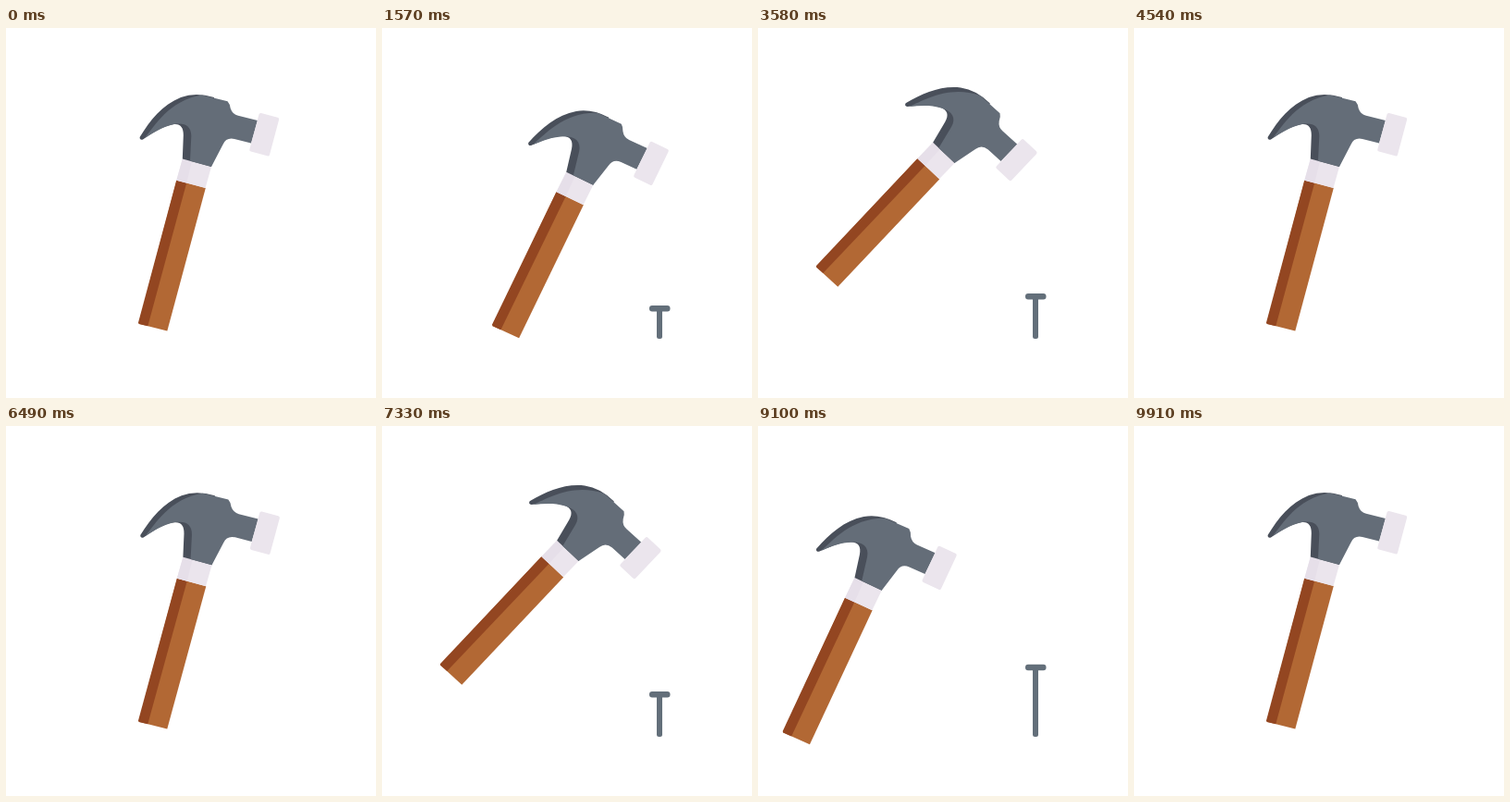
An HTML page for the animation above (9940 ms loop, 400 by 400 pixels).

```html
<!DOCTYPE html>
<html lang="en">
<head>
<meta charset="utf-8">
<title>Hammer and nail</title>
<style>
  html, body { margin: 0; width: 100%; height: 100%; overflow: hidden; background: #fff; }
  svg { display: block; width: 100%; height: 100%; }
</style>
</head>
<body>
<svg viewBox="0 0 400 400">
  <g id="nail" fill="#636f7a">
    <rect id="shank" x="297" width="6" rx="2.5"/>
    <rect id="cap" x="289" width="22.500" height="6.500" rx="3"/>
  </g>
  <g id="hammer">
    <path fill="#b26834" d="M143.500 319.800 174.300 327.500 215.800 173 184.500 164.500Z"/>
    <path fill="#934621" d="M143 318.500 143.800 320 153.300 322.300 195.200 167.500 184.300 164.500Z"/>
    <path fill="#ebe5ed" d="M184.300 164.700 215.500 173 222 150 190.800 141.500Z"/>
    <path fill="#e6dfe9" d="M184.300 164.700 195.200 167.600 201 144 190.800 141.500Z"/>
    <path fill="#494f5a" d="M144.600 118C156 99.500 169 83 189 75Q205 69 225 75L222 150 190.800 141.500 191.800 116C192 107 188 102.500 179 104.500 167 107 158 114 148 120.500Q144.500 121.500 144.600 118Z"/>
    <path fill="#646d78" d="M150 119C160 107 176 78 212 72.500L239.500 79.300Q242 82 242.700 87 245 93.500 251 94.800L272 100 265 124.500 247 120Q238 118 234.500 126L222 150 199 143.700 200.300 117C200.500 106 193 102 182 104 168 107 160 113 150 119Z"/>
    <rect x="268" y="93.700" width="22.400" height="43" rx="2" fill="#ebe5ed" transform="rotate(15 279.200 115.200)"/>
  </g>
</svg>
<script>
const LOOP = 9940, STEP = 30, START = 1030, BACK = 6400, LAST = 117;
const REST = { x: 143.5, y: 319.5 }, SWING = { x: 63, y: 258 };

const linear = p => p;
const easeIn = n => p => p ** n;
const easeOut = n => p => 1 - (1 - p) ** n;
const smooth = p => p * p * (3 - 2 * p);

// Each key: step, value, easing on the way there.
const turnKeys = [
  [-1, 0], [8, 14.3, smooth], [15, 11, smooth], [26, 10, smooth],
  [38, 57, easeIn(2.3)], [52, 15.5, easeOut(1.77)],
  [64, 60, easeIn(2.3)], [78, 12.8, easeOut(1.8)],
  [90, 72, easeIn(2.48)], [LAST, 0, easeOut(3.1)]
];
const xKeys = [
  [-1, REST.x], [15, 140, easeIn(2)], [26, 27, smooth],
  [38, SWING.x, easeOut(1.67)], [90, SWING.x, linear], [LAST, REST.x, easeOut(4.6)]
];
const yKeys = [
  [-1, REST.y], [15, REST.y, linear], [26, 331, smooth],
  [38, SWING.y, easeOut(1.67)], [90, SWING.y, linear], [LAST, REST.y, easeOut(4.6)]
];
const nailKeys = [
  [-1, 336], [16, 336, linear], [24, 261, easeOut(2)],
  [37, 261, linear], [38, 276, linear], [63, 276, linear], [64, 290.3, linear],
  [89, 290.3, linear], [90, 336, linear], [LAST, 336, linear]
];

function valueAt(keys, step) {
  const i = Math.max(1, keys.findIndex(key => key[0] >= step));
  const [from, a] = keys[i - 1], [to, b, ease] = keys[i];
  return a + (b - a) * ease((step - from) / (to - from));
}

// The strokes play forward, rest, then play backward.
function stepAt(time) {
  if (time < START) return -1;
  if (time < BACK) return Math.min(LAST, Math.floor((time - START) / STEP));
  return Math.max(-1, LAST - 1 - Math.floor((time - BACK) / STEP));
}

const byId = id => document.getElementById(id);
const hammer = byId('hammer'), nail = byId('nail'), shank = byId('shank'), cap = byId('cap');

function draw(time) {
  const step = stepAt(time);
  const x = valueAt(xKeys, step), y = valueAt(yKeys, step);
  hammer.setAttribute('transform',
    `translate(${x} ${y}) rotate(${valueAt(turnKeys, step)}) translate(${-REST.x} ${-REST.y})`);
  const top = valueAt(nailKeys, step);
  nail.setAttribute('visibility', top < 333 ? 'visible' : 'hidden');
  cap.setAttribute('y', top - 3.2);
  shank.setAttribute('y', top);
  shank.setAttribute('height', Math.max(0, 336 - top));
}

const begin = performance.now();
function tick() {
  draw((performance.now() - begin) % LOOP);
  requestAnimationFrame(tick);
}
tick();
</script>
</body>
</html>
```
